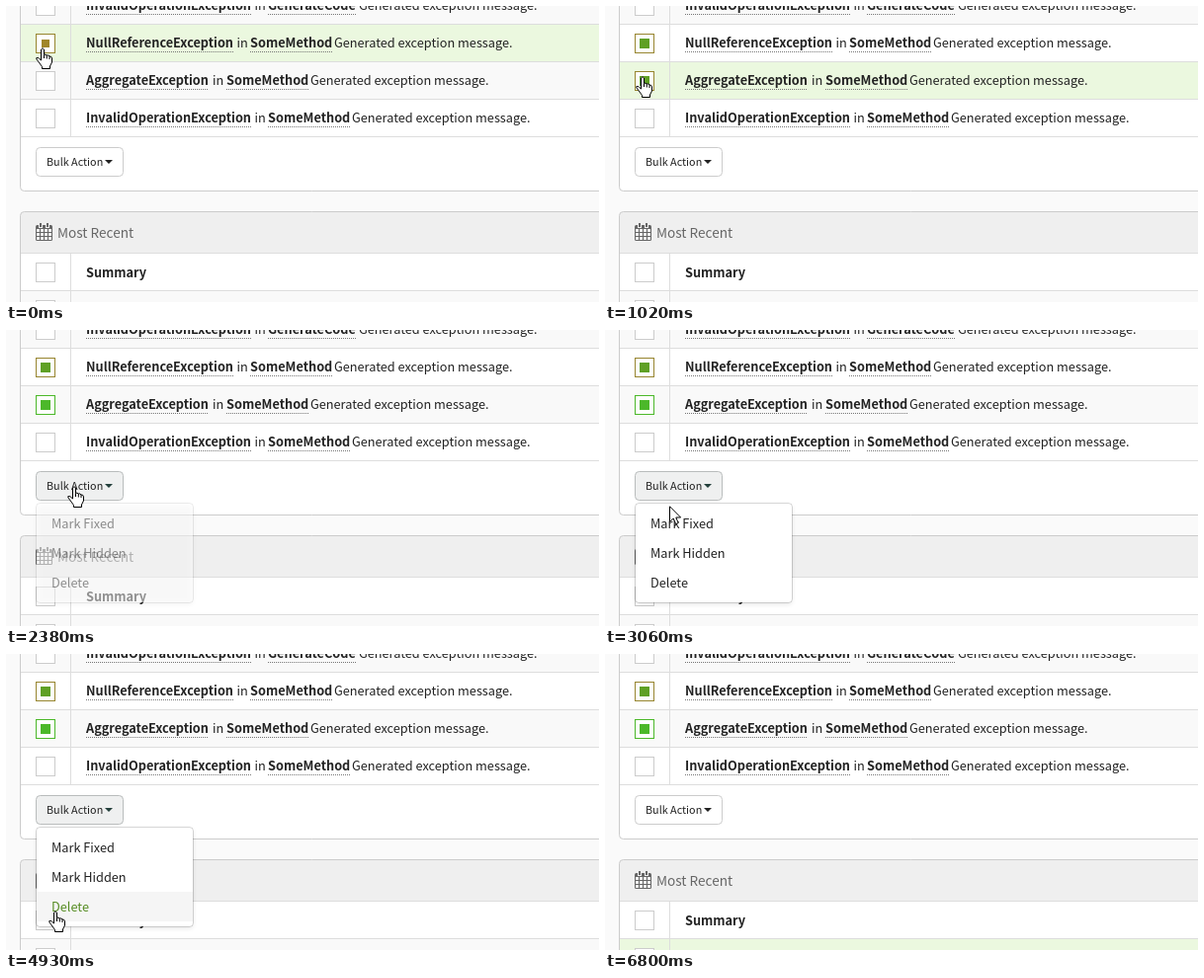
Animation of 600 by 300 pixels, one loop 7310 ms. Source, as an HTML page with a canvas:

```html
<!DOCTYPE html>
<html lang="en">
<head>
<meta charset="utf-8">
<title>Bulk actions</title>
<style>
html, body { margin: 0; width: 100%; height: 100%; overflow: hidden; background: #fafafa; }
canvas { display: block; }
</style>
</head>
<body>
<canvas id="stage" width="600" height="300"></canvas>
<script>
const ctx = document.getElementById('stage').getContext('2d');
const LOOP = 7310;
const FONT = '"Noto Sans CJK JP", "Noto Sans CJK SC", "Noto Sans CJK", "Source Sans Pro", "Noto Sans", sans-serif';
const SIZE = 12.72;
const INK = '#222';
const HAND = new Path2D('M5.5 13V2Q7-.6 8.5 2V7.5Q10 6.4 11.3 8Q13 7.2 14 9Q16.2 8.6 16.5 11V15L14.5 19V21.5H6.5V19.5L2.5 14Q.3 11.8.8 10.6Q2.3 9.2 5.5 13Z');
const FINGERS = new Path2D('M8.5 7.5V11M11.3 8V11.5M14 9V12');
const ARROW = new Path2D('M.5.8V16.5L4.2 13L6.7 18.7L9.2 17.6L6.8 12H11.6Z');

// Pointer stops: time, x, y
const STOPS = [
  [0, 30, 42], [170, 31, 60], [340, 31, 71],
  [1190, 31, 110], [1360, 31, 150], [1530, 40, 156], [1700, 51, 157],
  [1870, 57, 158], [2040, 62, 158],
  [3060, 65, 178], [3230, 56, 186], [3400, 48, 193],
  [3740, 47, 205], [3910, 46, 218], [4080, 44, 228],
  [4590, 44, 242], [4760, 44, 252], [4930, 43, 260],
  [6120, 185, 251], [6290, 230, 262], [6460, 290, 272], [6630, 330, 284], [6800, 340, 304]
];
const ROWS = [
  // y of the row, title, x of "in", method, its x, x of the message
  [-19, 'InvalidOperationException', 251.5, 'GenerateCode', 265, 357],
  [19, 'NullReferenceException', 233.5, 'SomeMethod', 247, 332],
  [57, 'AggregateException', 209, 'SomeMethod', 223, 308],
  [95, 'InvalidOperationException', 251.5, 'SomeMethod', 265, 350]
];
const ITEMS = ['Mark Fixed', 'Mark Hidden', 'Delete'];

function rect(x, y, w, h, color) {
  ctx.fillStyle = color;
  ctx.fillRect(x, y, w, h);
}

function roundBox(x, y, w, h, fill, stroke) {
  ctx.beginPath();
  ctx.roundRect(x, y, w, h, 4);
  ctx.fillStyle = fill;
  ctx.fill();
  ctx.strokeStyle = stroke;
  ctx.lineWidth = 1;
  ctx.stroke();
}

function text(str, x, y, size = SIZE, color = INK, weight = 400) {
  ctx.font = `${weight} ${size}px ${FONT}`;
  ctx.fillStyle = color;
  ctx.fillText(str, x, y);
  return ctx.measureText(str).width;
}

function link(str, x, y) {
  const end = x + text(str, x, y, SIZE, INK, 700);
  for (let dot = x; dot < end; dot += 2) rect(dot, y + 4, 1, 1, '#777');
}

function rowBase(y, color) {
  rect(15, y, 585, 37, color);
  rect(15, y + 37, 585, 1, '#ddd');
  rect(65, y, 1, 37, '#ddd');
}

function checkbox(y, mark, border = '#ccc', size = 10) {
  rect(30, y, 20, 20, border);
  rect(31, y + 1, 18, 18, '#fff');
  if (mark) rect(40 - size / 2, y + 10 - size / 2, size, size, mark);
}

function calendar() {
  ctx.beginPath();
  ctx.roundRect(30, 222, 17, 16, 1.5);
  ctx.fillStyle = '#666';
  ctx.fill();
  for (let i = 0; i < 12; i++) rect(31 + i % 4 * 4, 226 + (i >> 2) * 4, 3, 3, '#efefef');
  for (const x of [34, 41]) {
    rect(x - 1, 220, 4, 5, '#efefef');
    rect(x, 220, 2, 4, '#666');
  }
}

function marks(t) {
  const first = t < 170 ? '#a0862a' : '#5fa024';
  const second = t < 680 ? null : t < 850 ? '#a0862a' : t < 1020 ? '#7f9226' : t < 1190 ? '#5fa024' : '#4cb82a';
  return {
    1: [first, '#97852f', t < 170 ? 8 : 10],
    2: second ? [second, t < 1190 ? '#97852f' : '#4cb82a', t < 850 ? 8 : 10] : []
  };
}

function button(active) {
  roundBox(30.5, 143.5, 88, 29, active ? '#eff0f0' : '#fff', active ? '#b9bcbc' : '#ccc');
  text('Bulk Action', 41, 162, 10.8);
  ctx.beginPath();
  ctx.moveTo(100, 156);
  ctx.lineTo(108, 156);
  ctx.lineTo(104, 160);
  ctx.fillStyle = active ? '#24403c' : INK;
  ctx.fill();
}

function menu(hover, alpha) {
  ctx.save();
  ctx.globalAlpha = alpha;
  ctx.shadowColor = 'rgba(0,0,0,.1)';
  ctx.shadowBlur = 5;
  ctx.shadowOffsetY = 2;
  ctx.beginPath();
  ctx.roundRect(31, 176, 158, 100, 3);
  ctx.fillStyle = '#fff';
  ctx.fill();
  ctx.shadowColor = 'transparent';
  ctx.beginPath();
  ctx.roundRect(30.5, 175.5, 159, 101, 4);
  ctx.strokeStyle = 'rgba(0,0,0,.15)';
  ctx.stroke();
  ITEMS.forEach((name, i) => {
    if (i === hover) rect(31, 181 + i * 30, 158, 30, '#f5f5f5');
    text(name, 46, 201 + i * 30, SIZE, i === hover ? '#558c22' : INK);
  });
  ctx.restore();
}

function pointer(x, y, isArrow) {
  ctx.save();
  ctx.translate(x, y);
  ctx.fillStyle = '#fff';
  ctx.strokeStyle = '#000';
  ctx.lineWidth = 1;
  ctx.lineJoin = 'round';
  const shape = isArrow ? ARROW : HAND;
  ctx.fill(shape);
  ctx.stroke(shape);
  if (!isArrow) ctx.stroke(FINGERS);
  ctx.restore();
}

function draw(t) {
  const [, x, y] = STOPS.findLast(stop => stop[0] <= t);
  const menuAlpha = t < 2380 || t >= 6630 ? 0 : t < 2550 || t >= 6460 ? 0.5 : 1;
  const hoverItem = x < 190 ? Math.floor((y - 181) / 30) : -1;
  const hoverRow = t < 1360 ? Math.floor((y - 19) / 38) + 1 : -1;
  const rowColor = (base, hover) => hover ? '#ebf8df' : base;

  rect(0, 0, 600, 300, '#fafafa');
  roundBox(14.5, -10.5, 620, 198, '#fff', '#ccc');
  const state = marks(t);
  ROWS.forEach(([top, title, inX, method, methodX, messageX], i) => {
    rowBase(top, rowColor(i % 2 ? '#fff' : '#f9f9f9', i === hoverRow));
    checkbox(top + 9, ...(state[i] || []));
    const base = top + 23;
    link(title, 81, base);
    text('in', inX, base);
    link(method, methodX, base);
    text('Generated exception message.', messageX, base);
  });
  button(t >= 1360 && t < 6630);

  roundBox(14.5, 208.5, 620, 120, '#efefef', '#ccc');
  rect(15, 250, 585, 1, '#ddd');
  calendar();
  text('Most Recent', 52, 235, 13.6, '#666');
  rowBase(251, rowColor('#fff', x > 190 && y < 288));
  checkbox(260);
  text('Summary', 81, 275, SIZE, INK, 700);
  rowBase(289, rowColor('#f9f9f9', y >= 288));
  checkbox(298);

  if (menuAlpha) menu(hoverItem, menuAlpha);
  pointer(x, y, t >= 6290 || (t >= 3060 && t < 3230));
}

function tick(now) {
  draw(now % LOOP);
  requestAnimationFrame(tick);
}
draw(0);
requestAnimationFrame(tick);
</script>
</body>
</html>
```
